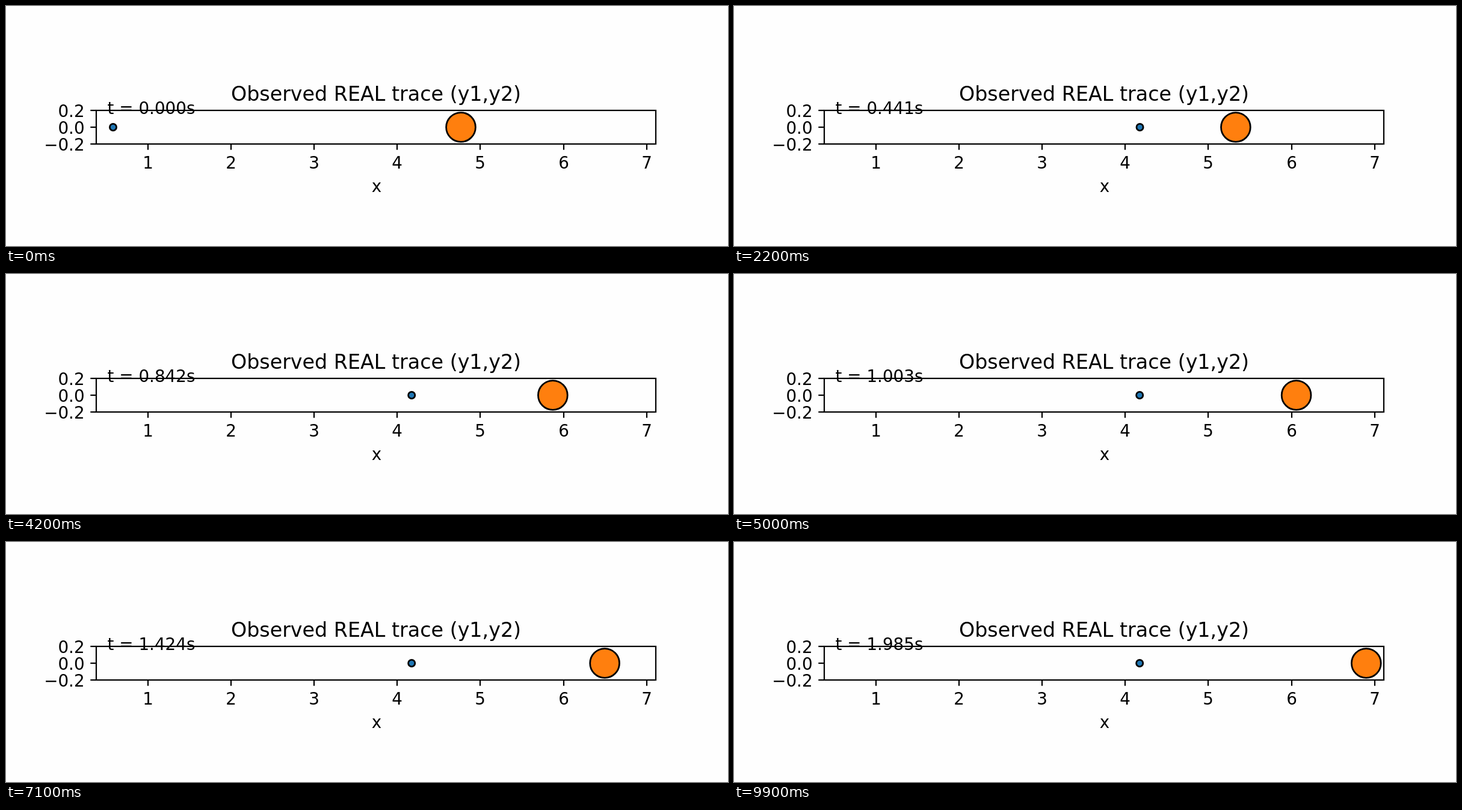
An HTML page for the animation above (10 s loop, 1200 px wide and 400 px high).

```html
<!DOCTYPE html>
<html lang="en">
<head>
<meta charset="utf-8">
<title>Observed trace</title>
<style>
  html, body { margin: 0; width: 100%; height: 100%; overflow: hidden; background: #fefefe; }
  svg { display: block; width: 1200px; height: 400px; font: 27.78px "DejaVu Sans", sans-serif; }
  .line { fill: none; stroke: #000; stroke-width: 2.22; }
  circle { stroke: #000; stroke-width: 2.78; }
</style>
</head>
<body>
<svg viewBox="0 0 1200 400">
  <circle id="small" cy="202" r="5.6" fill="#1f77b4"/>
  <circle id="big" cy="202" r="24.4" fill="#ff7f0e"/>
  <g id="axes"><rect class="line" x="150" y="174" width="930" height="56"/></g>
  <text x="615" y="158" font-size="33.33" text-anchor="middle">Observed REAL trace (y1,y2)</text>
  <text x="616" y="310" text-anchor="middle">x</text>
  <text id="clock" x="168.6" y="180"></text>
</svg>
<script>
const $ = id => document.getElementById(id);
const small = $("small"), big = $("big"), clock = $("clock");

const STEPS = 100, STEP_MS = 100, SECONDS_PER_STEP = 8 / 399;
const HIT = 4.9;            // step at which the balls touch
const SLIDE = 18.7;         // steps the small ball needs to stop after the hit
const START = 178, CONTACT = 726, REST = 674.2;

// [step, x] of the big ball from the hit onwards
const bigPath = [
  [HIT, 756], [11, 785], [22, 833.9], [34, 880.7], [44, 915.6], [50, 934.6], [60, 964.7],
  [66, 982.4], [77, 1009.6], [82, 1020.8], [88, 1032.7], [99, 1050.8]
];

function add(tag, attributes, text = "") {
  const node = document.createElementNS("http://www.w3.org/2000/svg", tag);
  for (const name in attributes) node.setAttribute(name, attributes[name]);
  node.textContent = text;
  $("axes").append(node);
}

for (let i = 1; i <= 7; i++) {
  const x = Math.round(97.7 + 138.15 * i);
  add("path", { class: "line", d: `M${x} 230v9.7` });
  add("text", { x, y: 271, "text-anchor": "middle" }, i);
}
["0.2", "0.0", "−0.2"].forEach((label, i) => {
  const y = 174 + 28 * i;
  add("path", { class: "line", d: `M150 ${y}h-9.7` });
  add("text", { x: 130.6, y: y + 11, "text-anchor": "end" }, label);
});

function slope(path, i) {
  const [t0, x0] = path[Math.max(i - 1, 0)];
  const [t1, x1] = path[Math.min(i + 1, path.length - 1)];
  return (x1 - x0) / (t1 - t0);
}

// Cubic Hermite curve through the points of a path
function along(path, t) {
  if (t <= path[0][0]) return path[0][1];
  const i = path.findIndex(point => point[0] >= t) - 1;
  const [t0, x0] = path[i], [t1, x1] = path[i + 1];
  const h = t1 - t0, u = (t - t0) / h, v = 1 - u;
  return x0 * v * v * (1 + 2 * u) + x1 * u * u * (3 - 2 * u)
    + h * u * v * (slope(path, i) * v - slope(path, i + 1) * u);
}

function smallX(step) {
  if (step < HIT) return START + (CONTACT - START) * step / HIT;
  const left = Math.max(0, 1 - (step - HIT) / SLIDE);
  return REST + (CONTACT - REST) * left * left;
}

function draw(now) {
  const step = Math.floor(now / STEP_MS) % STEPS;
  small.setAttribute("cx", smallX(step));
  big.setAttribute("cx", along(bigPath, step));
  clock.textContent = `t = ${(step * SECONDS_PER_STEP).toFixed(3)}s`;
  requestAnimationFrame(draw);
}
draw(0);
</script>
</body>
</html>
```
